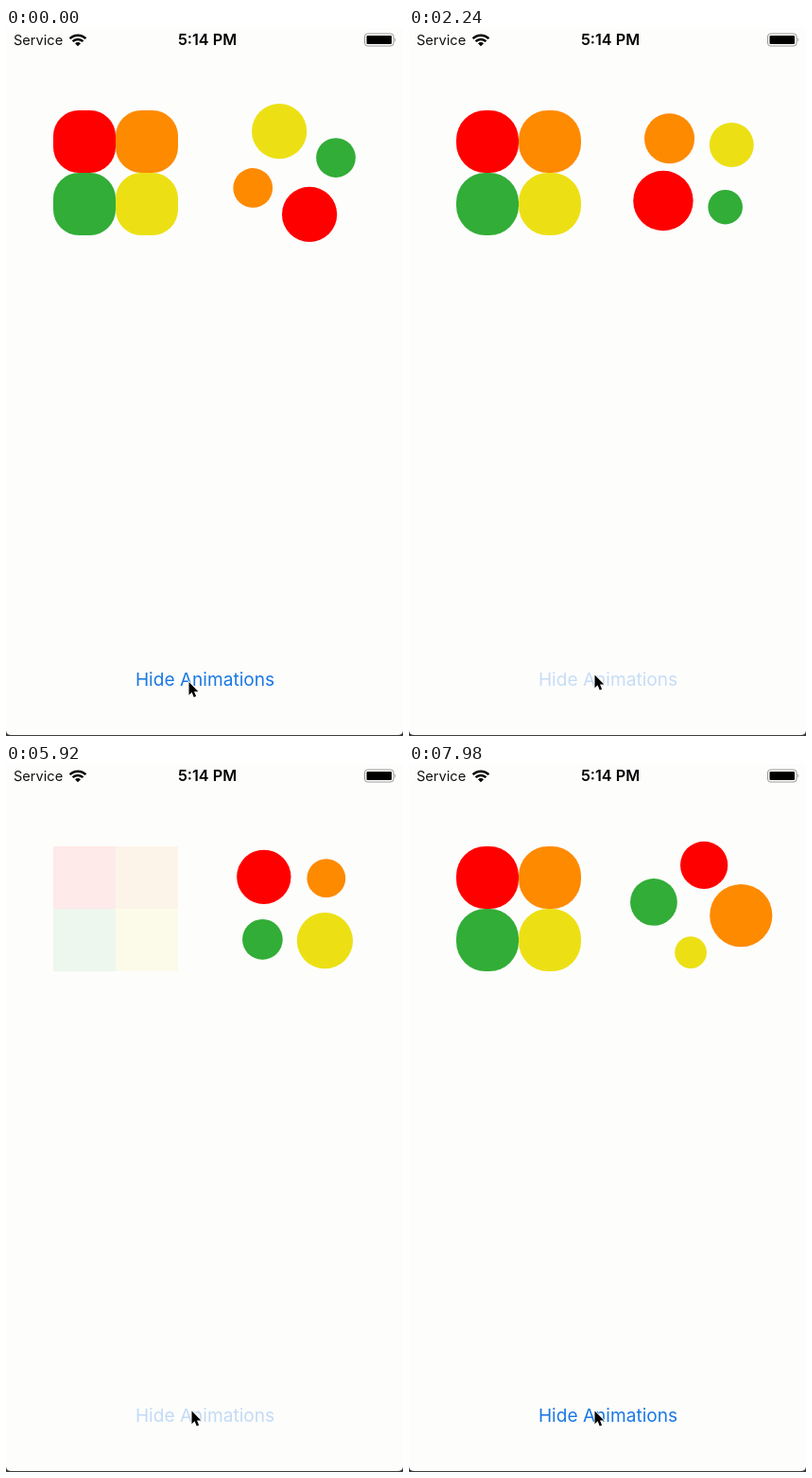
Write an HTML page that moves like this. It is 420 px wide and 748 px high and loops after 8000 ms.

```html
<!DOCTYPE html>
<html lang="en">
<head>
<meta charset="utf-8">
<title>Shape animations</title>
<style>
  html, body { margin: 0; width: 100%; height: 100%; overflow: hidden; background: #fdfdfc; }
  svg { display: block; width: 100vw; height: 100vh; }
  text { font-family: Inter, Roboto, sans-serif; }
</style>
</head>
<body>
<svg id="stage" viewBox="0 0 420 748">
  <rect width="420" height="748" fill="#fdfdfc"/>

  <text x="8" y="18" font-size="14.6" fill="#111">Service</text>
  <g fill="none" stroke="#000" stroke-width="2.6">
    <path d="M67.6 11.2A11.8 11.8 0 0 1 84.4 11.2"/>
    <path d="M70.6 14.2A7.6 7.6 0 0 1 81.4 14.2"/>
    <path d="M76 19.2L73 16.2A4.2 4.2 0 0 1 79 16.2Z" fill="#000" stroke="none"/>
  </g>
  <text x="213" y="18" font-size="16.2" font-weight="600" text-anchor="middle">5:14 PM</text>
  <rect x="379.5" y="6" width="30.5" height="13" rx="3" fill="none" stroke="#999"/>
  <rect x="381.5" y="8" width="26.5" height="9" rx="1"/>
  <path d="M411.3 10.3Q413.4 12.5 411.3 14.7Z" fill="#999"/>

  <g id="shapes"></g>

  <text id="button" x="210.5" y="695" font-size="19.1" fill="#1a78e4" text-anchor="middle">Hide Animations</text>

  <path d="M0 742Q0 747 6 747H414Q420 747 420 742V748H0Z" fill="#3c3c3c"/>
  <path id="cursor" d="M0 0V13.8L3.1 10.8L5.3 16L7.6 15L5.5 10H9.8Z"
        stroke="#fff" stroke-width="1.6" paint-order="stroke"/>
</svg>
<script>
const LOOP = 8000;
const HIDE = 52, SHOW = 127;        // steps at which the button is released
const PRESS = [46, 122];            // steps at which it is pressed
const FADE = 12;                    // steps the title needs to recover
const PULSE = 70, TURN = 1.22;      // steps per pulse, degrees per step

const byId = id => document.getElementById(id);
const clamp = v => Math.max(0, Math.min(1, v));
const ease = v => { v = clamp(v); return v * v * (3 - 2 * v); };
const triangle = p => 4 * Math.abs(p - Math.floor(p) - 0.5) - 1;

function add(name, attrs) {
  const el = document.createElementNS('http://www.w3.org/2000/svg', name);
  set(el, attrs);
  return byId('shapes').appendChild(el);
}

function set(el, attrs) {
  for (const key in attrs) el.setAttribute(key, attrs[key]);
}

// Clockwise from the top left.
const items = [
  { fill: '#ff0000', x: 50, y: 87, phase: 0.125 },
  { fill: '#fe8a00', x: 116, y: 87, phase: 0.375 },
  { fill: '#ece015', x: 116, y: 153, phase: 0.875 },
  { fill: '#32ad37', x: 50, y: 153, phase: 0.625 }
];
for (const item of items) {
  const { fill, x, y } = item;
  item.tile = add('rect', { x, y, width: 66, height: 66, fill });
  item.dot = add('circle', { fill });
}

// Screen updates come in threes: two short ones, then a long one.
function stepAt(ms) {
  return 3 * Math.floor(ms / 140) + Math.min(2, Math.floor(ms % 140 / 20));
}

// The first run stalls briefly and then catches up.
function firstRunAge(step) {
  return step < 9 ? 2 * Math.min(step, 4) : step + 10;
}

function tileLook(age, restart) {
  const u = age - restart;
  return u < 0
    ? { rx: 27 * ease((-u - 4) / 24), opacity: clamp(-u * 0.06) }
    : { rx: 31 * ease((u - 2) / 20), opacity: clamp((u + 0.25) * 0.06) };
}

function titleOpacity(step) {
  const i = step >= PRESS[1] ? 1 : 0;
  if (step < PRESS[i]) return 1;
  return 0.24 + 0.76 * ease((step - [HIDE, SHOW][i]) / FADE);
}

function draw(ms) {
  const step = stepAt(ms);
  const second = step >= SHOW;
  const age = second ? step - SHOW : firstRunAge(step);
  const look = tileLook(age, second ? 0 : 28);
  const start = second ? 225 : 70;

  items.forEach(({ tile, dot, phase }, i) => {
    const angle = (start + 90 * i + TURN * age) * Math.PI / 180;
    set(tile, look);
    set(dot, {
      cx: 305.1 + 46.7 * Math.cos(angle),
      cy: 153 + 46.7 * Math.sin(angle),
      r: 25 + 8.25 * triangle(phase + age / PULSE)
    });
  });
  byId('shapes').setAttribute('display', step < HIDE || second ? 'inline' : 'none');
  byId('button').setAttribute('opacity', titleOpacity(step));

  const moved = clamp(step / 4);
  byId('cursor').setAttribute('transform', `translate(${193.5 + 3 * moved} ${691 - 7.5 * moved})`);
}

const begin = performance.now();
function tick() {
  draw((performance.now() - begin) % LOOP);
  requestAnimationFrame(tick);
}
draw(0);
requestAnimationFrame(tick);
</script>
</body>
</html>
```
